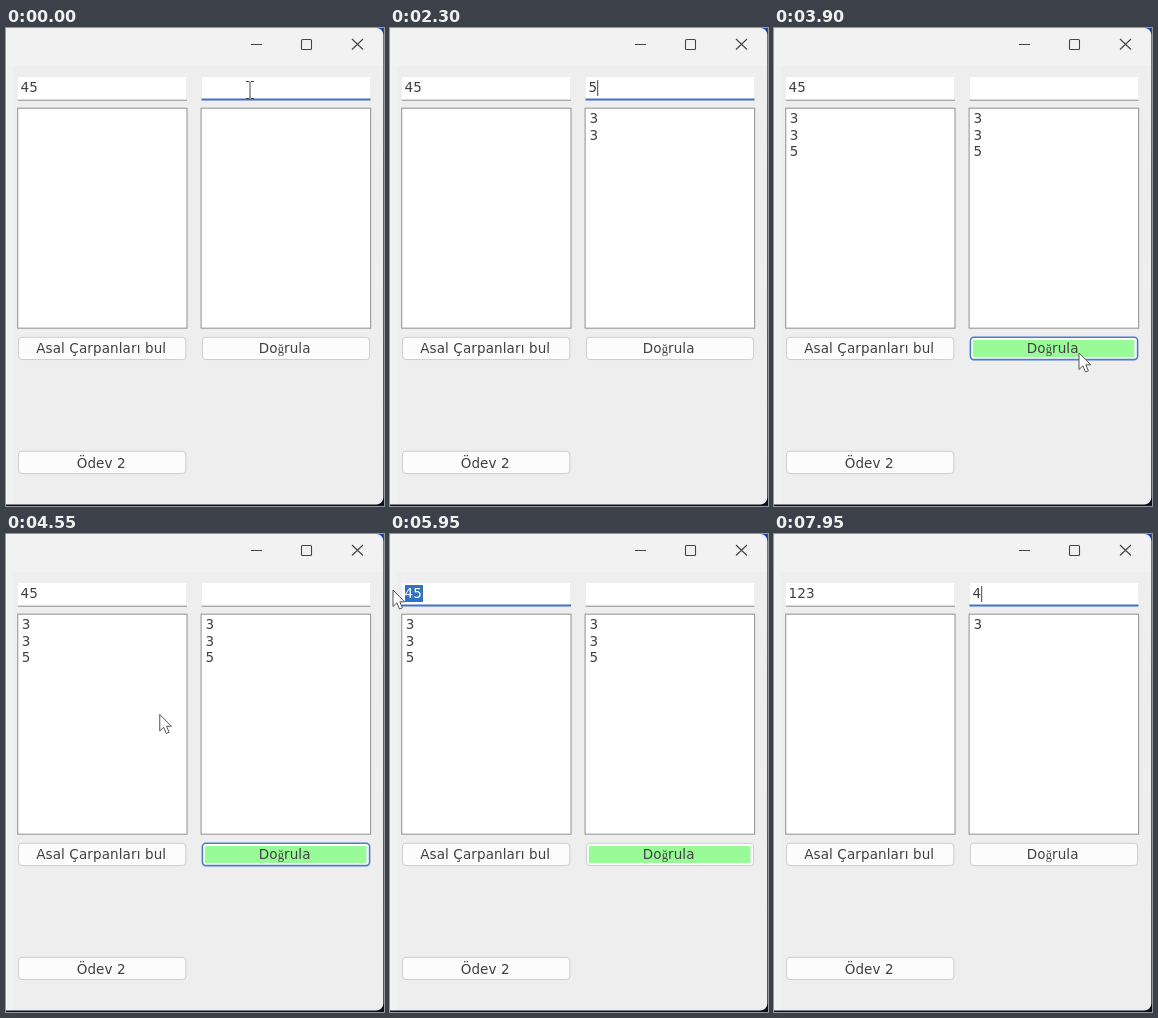
An HTML page that plays this animation: 378x478 px, repeating every 8 s.

```html
<!DOCTYPE html>
<html lang="tr">
<head>
<meta charset="utf-8">
<style>
html, body { margin: 0; width: 100%; height: 100%; overflow: hidden; }
body { background: linear-gradient(#2444a8, #16224c 30%, #0c1022); }
svg { display: block; }
text { font: 13.5px "DejaVu Sans", sans-serif; letter-spacing: .12px; fill: #404040; white-space: pre; }
.mid { text-anchor: middle; }
.small { font: 12.5px "Liberation Serif", serif; }
.list { fill: #fff; stroke: #a0a0a2; stroke-width: 1.2; }
.btn { fill: #fcfcfc; stroke: #cdcdcd; }
.focused { stroke: #4a7ccc; stroke-width: 1.6; }
</style>
</head>
<body>
<svg width="378" height="478" viewBox="0 0 378 478">
  <rect x="-20" y="0" width="397.3" height="476.5" rx="7" fill="#eee"/>
  <path d="M0 .5H370Q377 .5 377 8V38H0Z" fill="#f2f2f2"/>
  <rect y="38" width="7" height="438" fill="#f1f1f1"/>
  <g fill="none" stroke="#444" stroke-width="1.1">
    <path d="M245 16.5H256M346 11L357 21.5M357 11L346 21.5"/>
    <rect x="295.5" y="11.5" width="10" height="10" rx="1"/>
  </g>

  <rect x="12" y="49" width="168" height="23" fill="#fff"/>
  <rect x="196" y="49" width="168" height="23" fill="#fff"/>
  <rect id="lineL" x="12" width="169"/>
  <rect id="lineR" x="195.5" width="169"/>
  <rect id="sel" y="51" height="17" width="18" x="15" fill="#2f72c6"/>
  <text id="textL" x="14.5" y="63.8"></text>
  <text id="textR" x="198.5" y="63.8"></text>
  <rect id="caret" y="52" width="1" height="16" fill="#444"/>

  <rect class="list" x="11.7" y="80.2" width="169.3" height="220"/>
  <rect class="list" x="195.1" y="80.2" width="169.5" height="220"/>
  <g id="listL"></g>
  <g id="listR"></g>

  <rect class="btn" x="12.5" y="309.3" width="167.3" height="22.3" rx="3.5"/>
  <rect class="btn" x="12.5" y="423.3" width="167.3" height="22.3" rx="3.5"/>
  <rect class="btn" id="check" x="196.4" y="309.3" width="167.2" height="22.3" rx="3.5"/>
  <rect id="green" x="199" y="312" width="161.5" height="17" fill="#98fb98"/>
  <text class="mid" x="95.2" y="325">Asal Çarpanları bul</text>
  <text class="mid" x="278.7" y="325">Do<tspan class="small">ğ</tspan>rula</text>
  <text class="mid" x="95.2" y="439.5">Ödev 2</text>

  <path id="arrow" d="M0 0V16.5L3.9 12.8L6.5 19L9.4 17.8L6.8 11.8H11.7Z" fill="#fff" stroke="#555"/>
  <path id="beam" d="M-4 -8.5H-1L0 -7.5L1 -8.5H4M0 -7.5V7.5M-4 8.5H-1L0 7.5L1 8.5H4" fill="none" stroke="#444"/>
</svg>
<script>
const LOOP = 8000;
const $ = id => document.getElementById(id);
const set = (id, attrs) => { for (const k in attrs) $(id).setAttribute(k, attrs[k]); };
const show = (id, on) => set(id, { visibility: on ? 'visible' : 'hidden' });

// Each track lists [start time, value]; a value holds until the next one.
const leftText = [[0, '45'], [6200, '1'], [6310, '12'], [6430, '123']];
const rightText = [[0, ''], [450, '3'], [850, ''], [1100, '3'], [1300, ''],
  [2050, '5'], [2500, ''], [7450, '3'], [7650, ''], [7850, '4']];
const leftList = [[0, ''], [3700, '335'], [6550, '']];
const rightList = [[0, ''], [850, '3'], [1300, '33'], [2500, '335'], [6550, ''], [7650, '3']];
const focus = [[0, 'R'], [3700, 'check'], [5500, 'L'], [6750, 'R']];
const pointer = [[0, true], [400, false], [3150, true], [6150, false], [6550, true], [7450, false]];
const path = [[0, 244, 62], [3150, 244, 62], [3650, 305, 325], [4150, 305, 325], [4800, 80, 110],
  [5150, 73, 49], [5400, 38, 60], [5700, 38, 60], [5900, 3, 56], [6550, 3, 56],
  [6750, 244, 60], [6900, 246.5, 78], [LOOP, 246.5, 78]];

const at = (track, t) => track.findLast(s => s[0] <= t)[1];

function mouse(t) {
  const i = path.findIndex(p => p[0] > t);
  const [t0, x0, y0] = path[i - 1], [t1, x1, y1] = path[i];
  let k = (t - t0) / (t1 - t0);
  k *= k * (3 - 2 * k);
  return [x0 + (x1 - x0) * k, y0 + (y1 - y0) * k];
}

function fillList(id, x, digits) {
  const g = $(id);
  if (g.dataset.digits === digits) return;
  g.dataset.digits = digits;
  g.innerHTML = [...digits].map((d, i) => `<text x="${x}" y="${95 + i * 16.6}">${d}</text>`).join('');
}

function draw(t) {
  const owner = at(focus, t);
  const texts = { L: at(leftText, t), R: at(rightText, t) };
  const selected = t >= 5780 && t < 6200;
  for (const side of 'LR') {
    const on = owner === side;
    $('text' + side).textContent = texts[side];
    set('line' + side, { y: on ? 70.5 : 71.7, height: on ? 2 : 1, fill: on ? '#3f72c8' : '#8c8c8e' });
  }
  $('textL').style.fill = selected ? '#fff' : '';
  show('sel', selected);

  const typed = texts[owner];
  show('caret', typed && !selected && (t + 200) % 1000 < 600);
  if (typed) set('caret', { x: (owner === 'L' ? 15 : 198.5) + typed.length * 8.7 });

  fillList('listL', 15.7, at(leftList, t));
  fillList('listR', 199.5, at(rightList, t));
  show('green', t >= 3700 && t < 6550);
  $('check').classList.toggle('focused', owner === 'check');

  const [x, y] = mouse(t), visible = at(pointer, t);
  const inField = y > 50 && y < 73 && (x > 12 && x < 180 || x > 195 && x < 364);
  show('arrow', visible && !inField);
  show('beam', visible && inField);
  for (const id of ['arrow', 'beam']) set(id, { transform: `translate(${x} ${y})` });
}

const start = performance.now();
function tick() {
  draw((performance.now() - start) % LOOP);
  requestAnimationFrame(tick);
}
tick();
</script>
</body>
</html>
```
